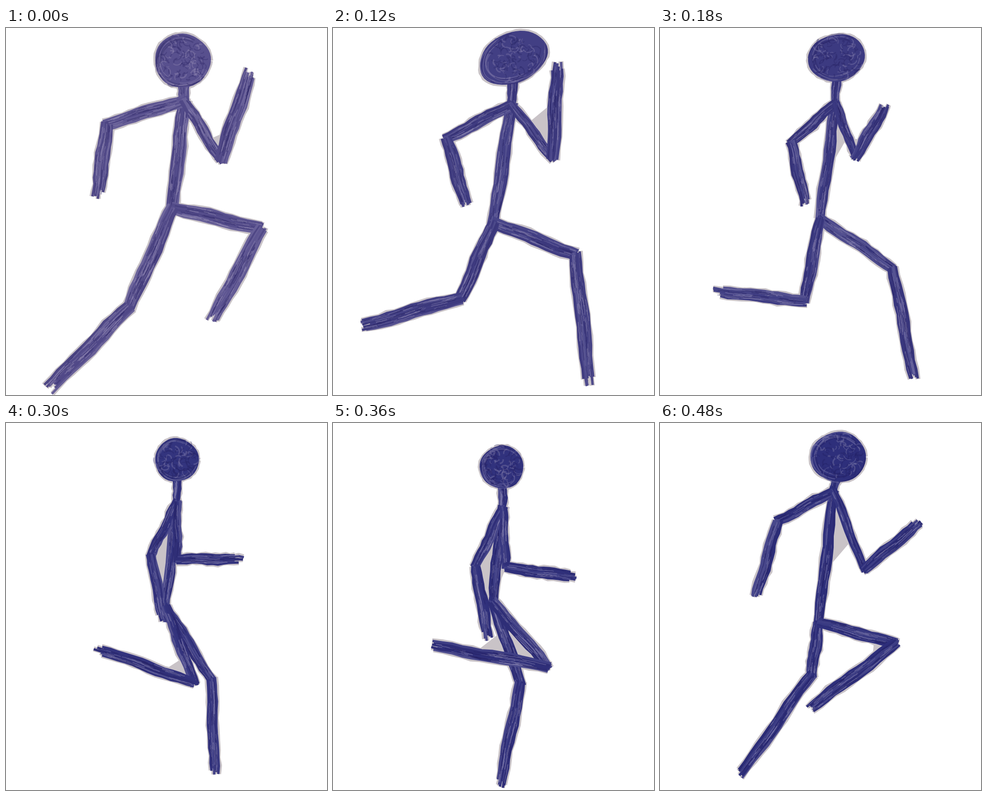
Animation of 700x800 px, one loop 0.54 s. Source, as an HTML page with a canvas:

```html
<!DOCTYPE html>
<html lang="en">
<head>
<meta charset="utf-8">
<title>Running stick figure</title>
<style>
html, body { margin: 0; width: 100%; height: 100%; overflow: hidden; background: #fff; }
canvas { display: block; }
</style>
</head>
<body>
<canvas id="stage" width="700" height="800"></canvas>
<script>
const STEP = 60, STEPS = 9, TAU = Math.PI * 2;
const PAPER = '#c9c3c7';
const ctx = document.getElementById('stage').getContext('2d');

// Key poses as joints. look: head radii, head tilt, pen width.
// Leg a starts in front, leg b behind; they trade places over the loop.
const push = {
  head: [385, 71], look: [62, 60, 0, 31], neck: [389, 158], hip: [363, 392],
  elbowB: [220, 210], handB: [200, 362], elbowF: [468, 288], handF: [533, 96],
  kneeA: [556, 437], footA: [452, 634], kneeB: [269, 607], footB: [97, 782]
};
const reach = {
  head: [392, 63], look: [61, 54, 0, 30], neck: [393, 163], hip: [363, 414],
  elbowB: [263, 217], handB: [235, 342], elbowF: [530, 252], handF: [537, 76],
  kneeA: [537, 444], footA: [612, 670], kneeB: [238, 607], footB: [36, 744]
};
const land = {
  head: [393, 65], look: [80, 55, -0.43, 29], neck: [390, 166], hip: [350, 424],
  elbowB: [249, 241], handB: [287, 378], elbowF: [479, 284], handF: [489, 84],
  kneeA: [528, 494], footA: [559, 770], kneeB: [279, 588], footB: [70, 648]
};
const glide = {
  head: [377, 65], look: [48, 48, 0, 21], neck: [376, 160], hip: [348, 408],
  elbowB: [323, 261], handB: [347, 390], elbowF: [373, 279], handF: [490, 259],
  kneeA: [487, 552], footA: [544, 740], kneeB: [351, 602], footB: [181, 500]
};
const pass = {
  head: [368, 96], look: [48, 47, 0, 25], neck: [370, 185], hip: [348, 390],
  elbowB: [311, 314], handB: [338, 465], elbowF: [377, 315], handF: [526, 335],
  kneeA: [409, 567], footA: [365, 783], kneeB: [469, 531], footB: [224, 486]
};
const lift = {
  head: [389, 74], look: [62, 55, 0, 25], neck: [379, 148], hip: [346, 435],
  elbowB: [257, 214], handB: [211, 373], elbowF: [445, 319], handF: [564, 219],
  kneeA: [330, 548], footA: [179, 762], kneeB: [514, 481], footB: [327, 622]
};

// name: [from, to, share of the pen width, free end]
const LIMBS = [
  ['head', 'neck', 0.75], ['neck', 'hip', 0.93],
  ['neck', 'elbowB', 0.9], ['elbowB', 'handB', 0.98, true],
  ['neck', 'elbowF', 0.76], ['elbowF', 'handF', 1, true],
  ['hip', 'kneeA', 0.98], ['kneeA', 'footA', 1, true],
  ['hip', 'kneeB', 1], ['kneeB', 'footB', 1.06, true]
];

// Narrow corners stay filled with paper: joint, its two sides, widest angle, range.
const CORNERS = [
  ['elbowF', 'neck', 'handF', 62, 35],
  ['kneeA', 'hip', 'footA', 62, 35],
  ['kneeB', 'hip', 'footB', 62, 35],
  ['neck', 'elbowB', 'hip', 40, 20],
  ['neck', 'elbowF', 'hip', 40, 20]
];

const lerp = (a, b, t) => a + (b - a) * t;
const mix = (a, b, t) => a.map((v, i) => lerp(v, b[i], t));
const between = (p, q) =>
  Object.fromEntries(Object.keys(p).map(k => [k, mix(p[k], q[k], 0.5)]));

const poses = [push, reach, land, between(land, glide), glide,
  between(glide, pass), pass, between(pass, lift), lift];

function seeded(seed) {
  let s = seed * 7919 + 17;
  return () => {
    s = (s + 0x6D2B79F5) | 0;
    let t = Math.imul(s ^ (s >>> 15), 1 | s);
    t = (t + Math.imul(t ^ (t >>> 7), 61 | t)) ^ t;
    return ((t ^ (t >>> 14)) >>> 0) / 4294967296;
  };
}

// The ink turns from worn violet to deep blue over the loop.
function inkAt(index) {
  const worn = Math.exp(-index / 3);
  return [43 + 45 * worn, 45 + 35 * worn, 122 + 20 * worn];
}

// Shade below 0 darkens the ink, above 0 moves it towards pale lilac.
function tint(ink, shade) {
  const to = shade < 0 ? [30, 24, 88] : [196, 188, 212];
  return `rgb(${mix(ink, to, Math.abs(shade)).map(Math.round).join()})`;
}

function trace(pts, color, width, alpha = 1) {
  ctx.beginPath();
  pts.forEach(([x, y]) => ctx.lineTo(x, y));
  ctx.globalAlpha = alpha;
  ctx.strokeStyle = color;
  ctx.lineWidth = width;
  ctx.stroke();
  ctx.globalAlpha = 1;
}

const shake = (pts, rnd, d) => pts.map(p => p.map(v => v + (rnd() - 0.5) * d));

// A limb is a bundle of pen strokes, a little thicker in the middle.
function makeLimb(pose, [from, to, share, free], rnd) {
  const a = pose[from], b = pose[to];
  const dx = b[0] - a[0], dy = b[1] - a[1], len = Math.hypot(dx, dy);
  const width = pose.look[3] * share, phase = rnd() * TAU;
  const line = (side, t0, t1, rough) => Array.from({ length: 13 }, (_, i) => {
    const t = lerp(t0, t1, i / 12);
    const bulge = 0.88 + 0.18 * Math.sin(Math.PI * Math.min(1, Math.max(0, t)));
    const off = side * (width * bulge / 2 - 2.6) +
      1.3 * Math.sin(t * 9 + phase) + (rnd() - 0.5) * rough;
    return [a[0] + dx * t - dy / len * off, a[1] + dy * t + dx / len * off];
  });
  const count = Math.max(4, Math.round(width / 3.6));
  const strokes = Array.from({ length: count }, (_, i) => {
    const side = 2 * i / (count - 1) - 1;
    const over = free ? lerp(-12, 11, rnd()) : lerp(0, 8, rnd());
    return line(side, -rnd() * 6 / len, 1 + over / len, 2.4);
  });
  return { line, strokes, len, count };
}

function drawCorner(pose, [joint, from, to, widest, range]) {
  const j = pose[joint], ends = [pose[from], pose[to]];
  const [a, b] = ends.map(p => Math.atan2(p[1] - j[1], p[0] - j[0]));
  const angle = Math.acos(Math.cos(a - b)) * 360 / TAU;
  const k = Math.min(1, (widest - angle) / range);
  if (k <= 0) return;
  ctx.beginPath();
  [j, ...ends.map(p => mix(j, p, k))].forEach(p => ctx.lineTo(...p));
  ctx.fillStyle = PAPER;
  ctx.fill();
}

function drawLimb({ line, strokes, len, count }, ink, rnd) {
  for (const pts of strokes) trace(pts, tint(ink, lerp(-0.22, 0.2, rnd())), 5.2);
  // short dark and pale pen marks
  for (let i = 0; i < count * len / 38; i++) {
    const t = rnd() * 0.95, side = lerp(-0.95, 0.95, rnd());
    const mark = line(side, t, Math.min(1, t + lerp(10, 55, rnd()) / len), 1);
    trace(mark, tint(ink, rnd() < 0.5 ? -0.7 : 0.6), lerp(1, 2.4, rnd()), 0.45);
  }
}

function ring(pose, k, phase, wobble) {
  const [cx, cy] = pose.head, [rx, ry, tilt] = pose.look;
  const c = Math.cos(tilt), s = Math.sin(tilt);
  return Array.from({ length: 49 }, (_, i) => {
    const a = i / 48 * TAU;
    const r = k * (1 + wobble * (Math.sin(3 * a + phase) + 0.6 * Math.sin(5 * a - phase * 2)));
    const x = rx * r * Math.cos(a), y = ry * r * Math.sin(a);
    return [cx + x * c - y * s, cy + x * s + y * c];
  });
}

function drawHead(pose, ink, phase, rnd) {
  trace(ring(pose, 0.93, phase, 0.018), tint(ink, 0), 6);
  ctx.fillStyle = tint(ink, 0);
  ctx.fill();
  // loops round the rim, then small curls inside
  for (let i = 0; i < 14; i++) {
    const pts = ring(pose, lerp(0.74, 0.97, rnd()), rnd() * TAU, 0.025);
    const from = Math.floor(rnd() * 30);
    trace(pts.slice(from, from + 10 + rnd() * 12), tint(ink, rnd() < 0.5 ? -0.5 : 0.4),
      lerp(1.5, 3, rnd()), 0.5);
  }
  const [rx, ry] = pose.look;
  for (let i = 0; i < 110; i++) {
    const a = rnd() * TAU, k = 0.84 * Math.sqrt(rnd()), turn = rnd() * TAU;
    const x = pose.head[0] + Math.min(rx, 62) * k * Math.cos(a);
    const y = pose.head[1] + ry * k * Math.sin(a), r = lerp(3, 13, rnd());
    const curl = Array.from({ length: 7 }, (_, n) =>
      [x + r * Math.cos(turn + n * 0.3), y + r * Math.sin(turn + n * 0.3)]);
    trace(curl, tint(ink, rnd() < 0.6 ? -0.6 : 0.5), lerp(1.3, 3.5, rnd()), 0.42);
  }
}

function draw(index) {
  const pose = poses[index], ink = inkAt(index), rnd = seeded(index + 1);
  ctx.fillStyle = '#fff';
  ctx.fillRect(0, 0, 700, 800);
  ctx.lineJoin = 'round';

  const limbs = LIMBS.map(limb => makeLimb(pose, limb, rnd));
  const phase = rnd() * TAU;

  CORNERS.forEach(corner => drawCorner(pose, corner));
  trace(shake(ring(pose, 0.97, phase, 0.018), rnd, 2), PAPER, 9);
  for (const { strokes } of limbs)
    for (const pts of strokes) trace(shake(pts, rnd, 3), PAPER, 11);

  limbs.forEach(limb => drawLimb(limb, ink, rnd));
  drawHead(pose, ink, phase, rnd);
}

const start = performance.now();
let shown = -1;

function tick() {
  const index = Math.floor((performance.now() - start) / STEP) % STEPS;
  if (index !== shown) draw(shown = index);
  requestAnimationFrame(tick);
}
tick();
</script>
</body>
</html>
```
